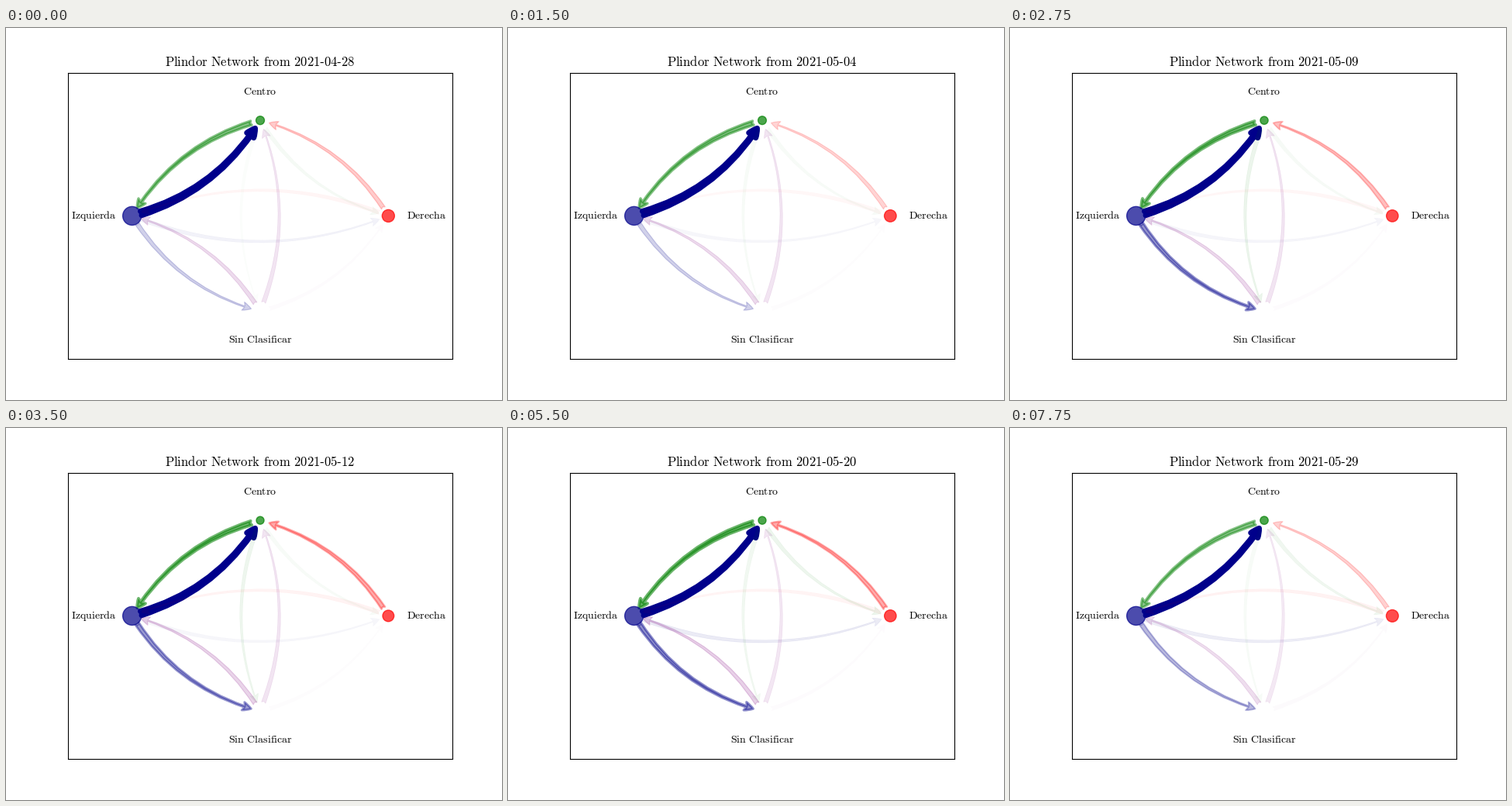
These frames come from a looping animation (640 by 480 pixels, 8 s). A matplotlib script:

```python
import matplotlib.pyplot as plt
import numpy as np
from matplotlib.animation import FuncAnimation
from matplotlib.patches import FancyArrowPatch

plt.rcParams["mathtext.fontset"] = "cm"

FRAMES = 32
KEY_DAYS = [0, 6, 11, 17, 22, 27, 31]
START = np.datetime64("2021-04-28")
MAX_WIDTH = 5  # outline width in points at weight 1

NODES = {
    "Izquierda": ((-1, 0), "darkblue"),
    "Derecha": ((1, 0), "red"),
    "Centro": ((0, 1), "green"),
    "Sin Clasificar": ((0, -1), "purple"),
}

# Relative edge weights on the key days
WEIGHTS = {
    ("Izquierda", "Centro"): [1] * 7,
    ("Izquierda", "Derecha"): [.05, .035, .04, .03, .08, .055, .07],
    ("Izquierda", "Sin Clasificar"): [.18, .18, .42, .37, .44, .14, .27],
    ("Derecha", "Izquierda"): [.04, .03, .035, .06, .045, .035, .05],
    ("Derecha", "Centro"): [.2, .17, .25, .42, .33, .22, .18],
    ("Centro", "Izquierda"): [.47, .48, .53, .58, .58, .57, .46],
    ("Centro", "Derecha"): [.04, .03, .035, .03, .07, .06, .06],
    ("Centro", "Sin Clasificar"): [.015, .03, .075, .06, .055, .015, .03],
    ("Sin Clasificar", "Izquierda"): [.14, .14, .15, .19, .18, .2, .13],
    ("Sin Clasificar", "Centro"): [.1, .1, .1, .1, .095, .09, .085],
    ("Sin Clasificar", "Derecha"): [.015, .01, .015, .01, .015, .018, .018],
}

NODE_SIZES = {
    "Izquierda": [300] * 7,
    "Derecha": [133, 125, 122, 101, 122, 128, 128],
    "Centro": [62, 60, 54, 50, 52, 54, 56],
}


def roman(text):
    text = text.replace(" ", r"\hspace{0.38}").replace("-", "\u2010")
    return rf"$\mathrm{{{text}}}$"


def on_day(values, day):
    return np.interp(day, KEY_DAYS, values)


fig, ax = plt.subplots(figsize=(6.4, 4.8), dpi=100)
ax.set(xlim=(-1.5, 1.5), ylim=(-1.5, 1.5), xticks=[], yticks=[])
title = ax.set_title("", fontsize=12)

arrows = {}
for source, target in WEIGHTS:
    (start, color), (end, _) = NODES[source], NODES[target]
    arrow = FancyArrowPatch(
        start, end, color=color, mutation_scale=20,
        arrowstyle="fancy,head_length=0.4,head_width=0.4,tail_width=0.2",
        connectionstyle="arc3,rad=0.2", shrinkA=8.66, shrinkB=8.66, zorder=1)
    arrows[source, target] = ax.add_patch(arrow)

spots = [NODES[name] for name in NODE_SIZES]
dots = ax.scatter([p[0] for p, _ in spots], [p[1] for p, _ in spots],
                  s=[100] * len(spots), c=[c for _, c in spots],
                  alpha=0.7, linewidths=1, zorder=2)

for name, ((x, y), _) in NODES.items():
    ax.text(1.3 * x, 1.3 * y - 0.028, roman(name), fontsize=10,
            ha="center", va="baseline", zorder=3)


def update(day):
    title.set_text(roman(f"Plindor Network from {START + day}"))
    for edge, arrow in arrows.items():
        weight = on_day(WEIGHTS[edge], day)
        arrow.set_alpha(weight)
        arrow.set_linewidth(MAX_WIDTH * weight)
    dots.set_sizes([on_day(sizes, day) for sizes in NODE_SIZES.values()])
    return [title, dots, *arrows.values()]


anim = FuncAnimation(fig, update, frames=FRAMES, interval=250,
                     repeat=True, repeat_delay=0, blit=False)
plt.show()
```
